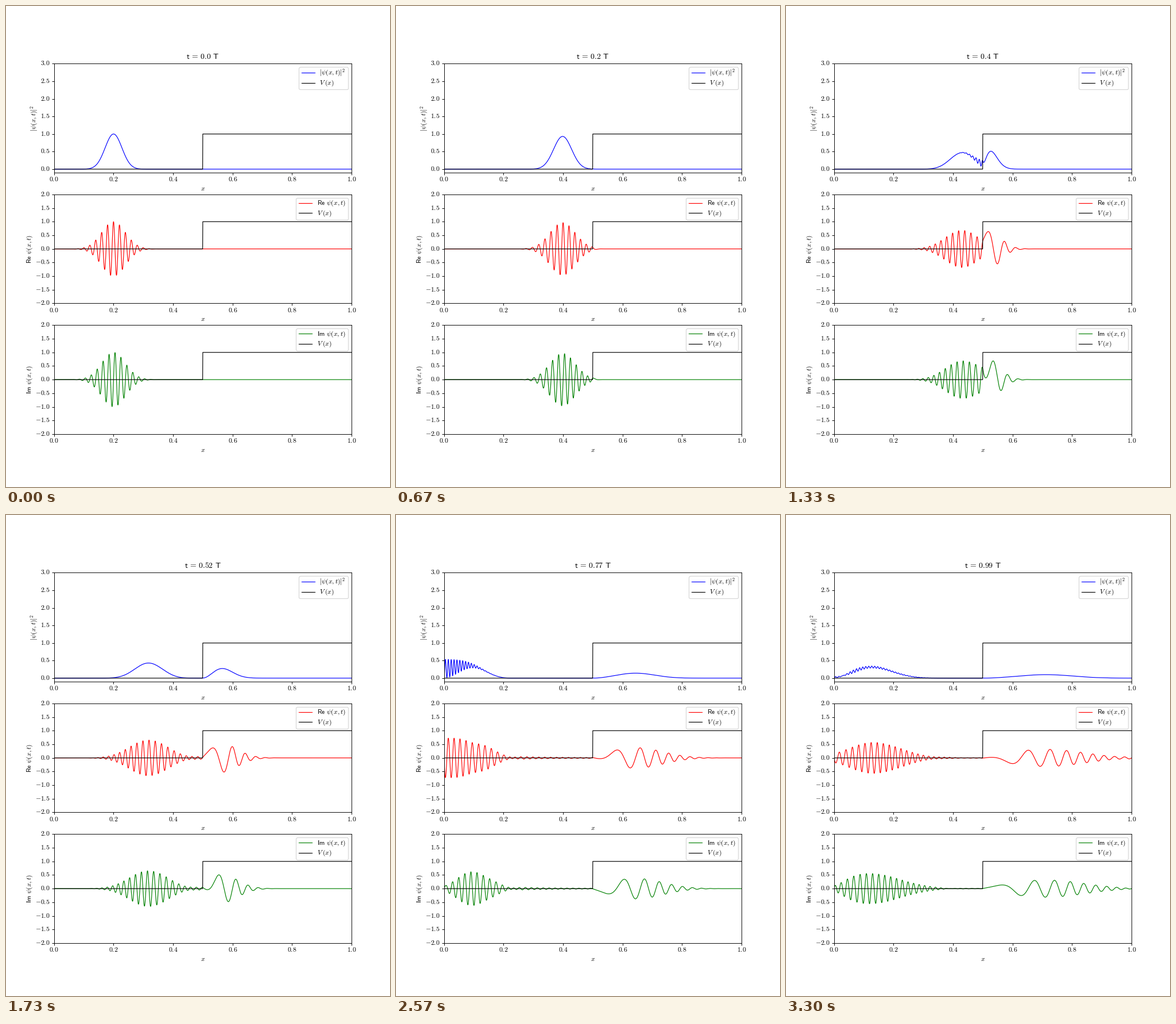
These frames come from a looping animation (669x837 px, 3.33 s). A matplotlib script:

```python
import numpy as np
import matplotlib.pyplot as plt
from matplotlib.animation import FuncAnimation
from matplotlib.patches import FancyBboxPatch
from matplotlib.transforms import Affine2D

plt.rcParams.update({
    "mathtext.fontset": "cm",
    "font.family": "Liberation Serif",  # its line height is close to Computer Modern
    "font.size": 10,
    "xtick.major.pad": 1.8,  # small pads offset the margin around math text
    "ytick.major.pad": 2.6,
    "ytick.alignment": "center",
})

DPI = 83.625
EM = 10 * DPI / 72    # font size in pixels
TICK_MS, TICKS = 30, 111
STEPS = 100           # time steps per period
K0 = 100 * np.pi      # mean wave number of the packet
X0, SIGMA = 0.2, 0.04
WALL = 0.5
V0 = K0**2 / 2        # step height equals the mean kinetic energy
PERIOD = 1 / K0       # time to cross the box at the mean speed
MODES = 400
DX = 1 / 1500         # grid spacing of the finite-difference Laplacian
GAP = r"\hspace{0.37}"
POTENTIAL = r"$V\hspace{0.25}(x)$"


def solve_box(x):
    """Eigenstates on x, their energies and the packet's coefficients."""
    n = np.arange(1, MODES + 1)
    basis = np.sqrt(2) * np.sin(np.pi * np.outer(x, n))
    kinetic = (1 - np.cos(np.pi * n * DX)) / DX**2
    left = 0.5 * (np.sinc((n[:, None] - n) / 2) - np.sinc((n[:, None] + n) / 2))
    energy, vectors = np.linalg.eigh(np.diag(kinetic) + V0 * (np.eye(MODES) - left))
    states = basis @ vectors
    packet = np.exp(-(x - X0)**2 / (2 * SIGMA**2) + 1j * K0 * (x - X0))
    return states, energy, states.T @ packet * (x[1] - x[0])


x = np.linspace(0, 1, 2001)
states, energy, coeffs = solve_box(x)


def wave(step):
    t = step / STEPS * PERIOD
    return states @ (coeffs * np.exp(-1j * energy * t))


def title_text(step):
    t = round(step / STEPS, 2)
    side = r"\hspace{0.17}"  # relations already carry some space
    return rf"$\mathsf{{t}}{side}={side}\mathsf{{{t}}}{GAP}\mathsf{{T}}$"


def draw_key(ax, rows, width, rise):
    """Legend in em units, measured from the top right corner of the axes."""
    corner = Affine2D().scale(EM).translate(ax.bbox.x1, ax.bbox.y1)
    left, top = -0.5 - width, -0.5
    height = rise + 2.55
    ax.add_patch(FancyBboxPatch(
        (left, top - height), width, height, transform=corner, snap=True,
        boxstyle="round,pad=0,rounding_size=0.2",
        fc="white", ec="0.8", lw=1, alpha=0.8, zorder=5))
    for i, (name, color) in enumerate(rows):
        base = top - 0.4 - rise - 1.5 * i
        ax.plot([left + 0.4, left + 2.4], [base + 0.35] * 2, color=color, lw=1,
                transform=corner, zorder=6)
        ax.text(left + 3.12, base + 0.08, name, transform=corner, zorder=6)


def setup(ax, name, color, ylim, ticks, width, rise):
    line, = ax.plot([], [], color=color, lw=1)
    ax.plot(x, x >= WALL, color="black", lw=1)
    ax.set_xlim(0, 1)
    ax.set_ylim(*ylim)
    ax.set_xticks(np.arange(6) / 5)
    ax.set_yticks(ticks)
    ax.xaxis.set_major_formatter("${x:.1f}$")
    ax.yaxis.set_major_formatter("${x:.1f}$")
    ax.set_xlabel("$x$", labelpad=3.3)
    ax.set_ylabel(name, labelpad=2.2)
    draw_key(ax, [(name, color), (POTENTIAL, "black")], width, rise)
    return line


fig, axes = plt.subplots(3, 1, figsize=(8, 10.009), dpi=DPI)
fig.subplots_adjust(left=0.125, right=0.9, bottom=0.11, top=0.88, hspace=0.2)

psi = r"\psi(x,t)"
wide = np.arange(-4, 5) / 2
lines = [
    setup(axes[0], f"$|{psi}|^2$", "blue", (-0.1, 3), np.arange(7) / 2, 7.41, 0.81),
    setup(axes[1], rf"$\mathsf{{Re}}{GAP}{psi}$", "red", (-2, 2), wide, 7.83, 0.75),
    setup(axes[2], rf"$\mathsf{{Im}}{GAP}{psi}$", "green", (-2, 2), wide, 7.83, 0.75),
]
title = axes[0].set_title(title_text(0), fontsize=11.8, pad=6.9)


def update(tick):
    step = (18 * tick + 15) // 20  # steps last 30 or 40 ms, 33.3 ms on average
    w = wave(step)
    for line, y in zip(lines, (np.abs(w)**2, w.real, w.imag)):
        line.set_data(x, y)
    title.set_text(title_text(step))
    return [*lines, title]


anim = FuncAnimation(fig, update, frames=TICKS, interval=TICK_MS,
                     init_func=lambda: update(0), repeat=True, blit=False)
plt.show()
```
